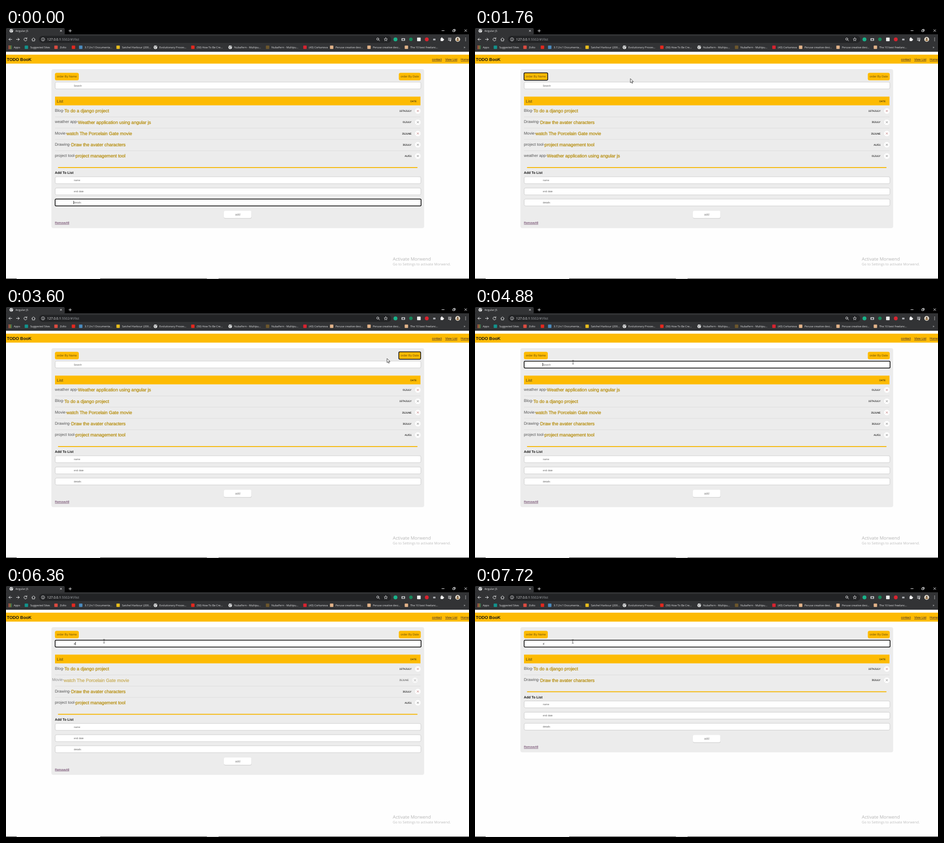
An HTML page for the animation above (8000 ms loop, 954 by 518 pixels).

```html
<!DOCTYPE html>
<html lang="en">
<head>
<meta charset="utf-8">
<title>TODO BooK</title>
<style>
  html, body { margin: 0; width: 100%; height: 100%; overflow: hidden; background: #fefefe; }
  svg { display: block; width: 954px; height: 518px; font-family: "Liberation Sans", Arial, sans-serif; text-rendering: geometricPrecision; }
  .ui { font-family: "Open Sans", "Noto Sans", sans-serif; }
  .line { fill: none; stroke: #e4e5e7; stroke-width: 1; stroke-linecap: round; stroke-linejoin: round; }
</style>
</head>
<body>
<svg id="stage" viewBox="0 0 954 518" xmlns="http://www.w3.org/2000/svg"></svg>
<script>
const LOOP = 8000, PITCH = 23.25;
const BY_NAME_AT = 1000, BY_DATE_AT = 2940, SEARCH_AT = 4770, TYPE_AT = 6085;
const LEAVE_AT = 6090, LEAVE_MS = 200;
const GOLD = '#fdbb03', BAR = '#323335';
const stage = document.getElementById('stage');

// Markup helpers
const text = (x, y, size, fill, str, more = '') =>
  `<text x="${x}" y="${y}" font-size="${size}" fill="${fill}" ${more}>${str}</text>`;
const rect = (x, y, w, h, fill, r = 0, more = '') =>
  `<rect x="${x}" y="${y}" width="${w}" height="${h}" rx="${r}" fill="${fill}" ${more}/>`;
const dot = (x, y, r, fill) => `<circle cx="${x}" cy="${y}" r="${r}" fill="${fill}"/>`;
const path = (d, more = '') => `<path class="line" d="${d}" ${more}/>`;
const group = (id, body, more = '') => `<g id="${id}" ${more}>${body}</g>`;
const globe = (x, y) => dot(x, y, 3.7, '#eceded') +
  path(`M${x - 2.6} ${y - 1.4}l2 1.2l-.4 1.6l1.2 1.4M${x + .6} ${y - 2.8}l.4 1.5l1.8 .6`, 'style="stroke:#4a4c50"');

function browser() {
  const label = (x, str) => text(x, 41.8, 5.6, '#e4e5e7', str);
  const marks = [
    [42, '#12938c', 'Suggested Sites'], [103, '#dc4b40', 'Zolto'], [139, '#e3281e', ''],
    [154, '#4b8bbe', '3.7.2rc1 Documenta...'], [231, '#e8bd1c', 'Satchel Harbour (200...'],
    [308, '', 'Evolutionary Proces...'], [385, '#e3281e', '(50) How To Be Cre...'],
    [462, '', 'NubaFern - Multipu...'], [539, '#6d572c', 'NubaFern - Multipu...'],
    [616, '#d8232f', '(43) Corkanova'], [671, '#e2b389', 'Peruse creative desi...'],
    [748, '#e2b389', 'Peruse creative desi...'], [825, '#e2b389', 'The 10 best freelanc...']
  ];
  const bar = marks.map(([x, color, name]) =>
    (color ? rect(x - 3.5, 36.2, 7, 7, color, 1) : globe(x, 39.7)) + label(x + 8, name)).join('');
  let apps = '';
  for (let i = 0; i < 9; i++)
    apps += rect(5 + i % 3 * 2.6, 36.4 + Math.floor(i / 3) * 2.6, 1.8, 1.8,
      ['#e2574c', '#e9b93c', '#4c9a5c'][i % 3]);

  return rect(0, 0, 954, 13, '#000') + rect(0, 13, 954, 36, BAR) +
    rect(0, 0, 121, 14, BAR, 3) + rect(68, 16.3, 726, 14.4, '#222325', 7.2) +
    globe(11, 5.8) + text(19.5, 8, 5.6, '#e4e5e7', 'Angular JS') +
    path('M111.7 4.2l3.2 3.2m0-3.2l-3.2 3.2M129.5 5.8h5.4m-2.7-2.7v5.4') +
    path('M898 5.5h5M945 3.2l4.4 4.4m0-4.4l-4.4 4.4M921 4.2h3.4v3.4h-3.4zM922.2 4v-1.2h3.4v3.4h-1') +
    path('M12 23.5h-6m2.7-2.7l-2.7 2.7l2.7 2.7M21.5 23.5h6m-2.7-2.7l2.7 2.7l-2.7 2.7') +
    path('M42.6 21.7a3.1 3.1 0 1 0 .5 2.8M43 20v2.2h-2.2M53 23.6l3.6-3.3l3.6 3.3M54.2 23v3.7h4.8v-3.7') +
    path('M76.3 23.2v2.2M76.3 21.7v.1') +
    '<circle class="line" cx="76.3" cy="23.5" r="3.4" style="stroke-width:.8"/>' +
    text(84.8, 25.9, 6.75, '#f1f2f3', '127.0.0.1<tspan fill="#a4a8ad">:5502/#!/list</tspan>') +
    '<circle class="line" cx="766" cy="22.8" r="2.2"/>' + path('M767.8 24.6l2 2') +
    path('M782.5 19.9l1 2.4l2.5 .2l-1.9 1.7l.6 2.5l-2.2-1.4l-2.2 1.4l.6-2.5l-1.9-1.7l2.5-.2z', 'style="stroke-width:.8"') +
    dot(802.5, 23.5, 4, '#18b38a') + rect(814.8, 21, 7.5, 5.6, '#b9bbbf', 1) + dot(818.5, 23.8, 1.6, BAR) +
    dot(834.3, 23.3, 3.6, '#168558') + rect(847, 19.8, 7.4, 7.4, '#ededed', 1) +
    dot(867, 23.5, 3.9, '#d8232f') + rect(880, 22, 5, 3.4, '#aaadb1', .5) +
    rect(895.4, 21.3, 5.6, 5.6, '#f0f0f0', .8) + dot(898, 21, 1.4, '#f0f0f0') + dot(901.2, 24, 1.4, '#f0f0f0') +
    path('M911.3 21h6m-6 2.2h6m-6 2.2h2.8M916.2 26.4v-3') + dot(915.4, 26.3, 1.2, '#e4e5e7') +
    dot(930.7, 23.5, 5, '#e3ddd0') + rect(928, 23.5, 5.4, 3.5, '#9a7549', 1.7) + dot(930.7, 22, 1.8, '#6d5641') +
    dot(947, 20.8, .8, '#e4e5e7') + dot(947, 23.5, .8, '#e4e5e7') + dot(947, 26.2, .8, '#e4e5e7') +
    apps + label(16, 'Apps') + bar + text(943, 42, 7, '#e4e5e7', '»');
}

const field = (y, hint, id) =>
  rect(101.3, y, 753.6, 14.2, '#fff', 2.8, 'stroke="#cfcfcf" stroke-width="1"') +
  text(139.8, y + 8.9, 5.2, '#5c5c5c', hint, `id="${id}"`);
const button = (x, w, str) =>
  rect(x, 92.4, w, 15.5, GOLD, 3.5) + text(x + w / 2, 102, 6.12, '#6d520c', str, 'text-anchor="middle"');
const ring = (id, x, y, w, h) =>
  rect(x, y, w, h, 'none', 2, `id="${id}" stroke="#0c0c0c" stroke-width="1.5"`);

// name, detail, detail x, date
const items = [
  ['Blog-', 'To do a django project', 120.3, '15THJULY'],
  ['weather app-', 'Weather application using angular js', 148.3, '01JULY'],
  ['Movie-', 'watch The Porcelain Gate movie', 124.8, '25JUNE'],
  ['Drawing-', 'Draw the avater characters', 134.3, '30JULY'],
  ['project tool-', 'project management tool', 143.2, 'AUG1']
];
const BLOG = 0, WEATHER = 1, MOVIE = 2, DRAWING = 3, PROJECT = 4;
const initial = [BLOG, WEATHER, MOVIE, DRAWING, PROJECT];
const byName = [BLOG, DRAWING, MOVIE, PROJECT, WEATHER];
const byDate = [WEATHER, BLOG, MOVIE, DRAWING, PROJECT];
const leaving = [WEATHER, MOVIE, PROJECT];

const row = ([name, detail, x, date], i) => group('row' + i,
  text(100.8, 173, 8.2, '#555', name) +
  text(x, 174.4, 9.35, '#b48a06', detail, 'stroke="#b48a06" stroke-width=".25"') +
  text(835.6, 173, 5.2, '#1c1c1c', date, 'text-anchor="end" stroke="#1c1c1c" stroke-width=".1"') +
  dot(848.6, 171.2, 5.7, '#fff') +
  `<path id="cross${i}" d="M846.6 169.2l4 4m0-4l-4 4" fill="none" stroke-width="1"/>`);
const rules = [1, 2, 3, 4].map(i =>
  rect(101, 159.8 + i * PITCH, 753, .9, '#dcdcdc', 0, `id="rule${i}"`)).join('');

const footer =
  rect(107, 286.9, 741, 2.1, '#f5ba14', 1) +
  text(100.8, 301.4, 7.05, '#111', 'Add To List', 'font-weight="bold"') +
  field(307, 'name', 'hintName') + field(330.2, 'end date', 'hintDate') + field(353, 'details', 'hintDetails') +
  ring('ringDetails', 101.3, 353, 754, 14.2) +
  rect(139.1, 356.3, .8, 7.4, '#111', 0, 'id="caretDetails"') +
  rect(449, 378.4, 57, 15, '#d3d3d3', 3) + rect(449, 377.3, 56.6, 15, '#fff', 3) +
  text(477.4, 387.1, 6.3, '#777', 'add', 'text-anchor="middle"') +
  text(100.8, 403.9, 6.1, '#54244f', 'RemoveAll', 'text-decoration="underline"');

const link = (x, str) => text(x, 67, 6.25, '#2c2036', str, 'text-decoration="underline"');

stage.innerHTML =
  rect(0, 0, 954, 518, '#fefefe') + group('chrome', browser(), 'class="ui"') +
  rect(0, 55, 954, 18.5, GOLD) +
  text(1.8, 67.6, 8.75, '#111', 'TODO BooK', 'font-weight="bold"') +
  link(877.8, 'contact') + link(905, 'View List') + link(937, 'Home') +
  rect(93.6, 84.9, 768, 328, '#ececec', 4, 'id="panel"') +
  button(100.8, 49.2, 'order By Name') + ring('ringName', 101, 92.4, 48.8, 15.4) +
  button(809.4, 45.2, 'order By Date') + ring('ringDate', 809.4, 92.4, 45, 15.4) +
  field(111.6, 'Search', 'query') + ring('ringSearch', 101.3, 111.7, 754, 14.2) +
  rect(139.1, 115, .8, 7.4, '#111', 0, 'id="caretSearch"') +
  rect(101, 141.6, 753, 18, GOLD) + text(104.8, 153.6, 8.3, '#4b3f1c', 'List') +
  text(846.2, 153, 5, '#111', 'DATE', 'text-anchor="end"') +
  rules + items.map(row).join('') + group('footer', footer) +
  group('notice', text(797, 480, 9.3, '#b4b4b4', 'Activate Morwend') +
    text(797, 490.4, 7.2, '#bcbcbc', 'Go to Settings to activate Morwend.'), 'class="ui"') +
  rect(0, 517, 954, 1, '#2b2b2b') + rect(22, 517, 172, 1, '#e6e6e6') + rect(414, 517, 24, 1, '#b5b5b5') +
  group('arrow', '<path d="M0 0v8.6l2-1.8l1.4 3l1.4-.7l-1.4-2.9h2.8z" fill="#fff" stroke="#222" stroke-width=".8"/>') +
  group('beam', '<path d="M-1.7-3.8h1.2l.5 .5l.5-.5h1.2M0-3.3v6.6M-1.7 3.8h1.2l.5-.5l.5 .5h1.2" fill="none" stroke="#333" stroke-width=".8"/>');

const el = {};
stage.querySelectorAll('[id]').forEach(n => el[n.id] = n);
const set = (id, key, value) => el[id].setAttribute(key, value);
const show = (id, on) => set(id, 'display', on ? 'inline' : 'none');

const track = [
  [80, 528, 524], [880, 126, 99], [1120, 126, 99], [1800, 322, 104.5], [1880, 322, 104.5],
  [2680, 829, 98], [2720, 829, 98], [2760, 826, 99], [3080, 826, 99], [3720, 781, 107],
  [3800, 781, 107], [4600, 202, 114], [7120, 202, 114], [7440, 201.5, 114.5]
];
function pointer(t) {
  const i = track.findIndex(k => k[0] > t);
  if (i === 0) return track[0].slice(1);
  if (i < 0) return track[track.length - 1].slice(1);
  const [t0, x0, y0] = track[i - 1], [t1, x1, y1] = track[i];
  const p = (t - t0) / (t1 - t0), s = p * p * (3 - 2 * p);
  return [x0 + (x1 - x0) * s, y0 + (y1 - y0) * s];
}

function caretOn(t) {
  if (t < TYPE_AT) return t < 5300 || t >= 5780;
  return t < 6600 || (t >= 7130 && t < 7660);
}

function drawList(t) {
  const progress = i => {
    const k = leaving.indexOf(i);
    return k < 0 ? 0 : Math.min(1, Math.max(0, (t - LEAVE_AT - k * LEAVE_MS) / LEAVE_MS));
  };
  const order = t < BY_NAME_AT ? initial : t < BY_DATE_AT ? byName : byDate;
  const rows = order.filter(i => progress(i) < 1);
  items.forEach((_, i) => show('row' + i, rows.includes(i)));
  rows.forEach((i, slot) => {
    const p = progress(i), dx = -8 * (1 - (1 - p) ** 3);
    set('row' + i, 'transform', `translate(${dx} ${slot * PITCH})`);
    set('row' + i, 'opacity', 1 - p);
    set('cross' + i, 'stroke', slot === 0 || slot === 2 ? '#c08080' : '#858585');
  });
  for (let i = 1; i < 5; i++) show('rule' + i, i < rows.length);
  const lift = (rows.length - 5) * PITCH;
  set('footer', 'transform', `translate(0 ${lift})`);
  set('panel', 'height', 328 + lift);
}

function draw(t) {
  drawList(t);
  const typed = t >= TYPE_AT, searching = t >= SEARCH_AT;
  show('ringDetails', t < BY_NAME_AT);
  show('caretDetails', t < BY_NAME_AT);
  show('ringName', t >= BY_NAME_AT && t < BY_DATE_AT);
  show('ringDate', t >= BY_DATE_AT && !searching);
  show('ringSearch', searching);
  show('caretSearch', searching && caretOn(t));
  set('caretSearch', 'x', typed ? 142.8 : 139.1);
  el.query.textContent = typed ? 'd' : 'Search';
  set('query', 'fill', typed ? '#111' : '#5c5c5c');

  const [x, y] = pointer(t);
  const inField = x > 101 && x < 855 && [111, 307, 330, 353].some(top => y >= top && y < top + 15);
  show('arrow', !inField);
  show('beam', inField);
  set(inField ? 'beam' : 'arrow', 'transform', `translate(${x} ${y})`);
}

const start = performance.now();
function frame(now) {
  draw(Math.max(0, now - start) % LOOP);
  requestAnimationFrame(frame);
}
draw(0);
requestAnimationFrame(frame);
</script>
</body>
</html>
```
